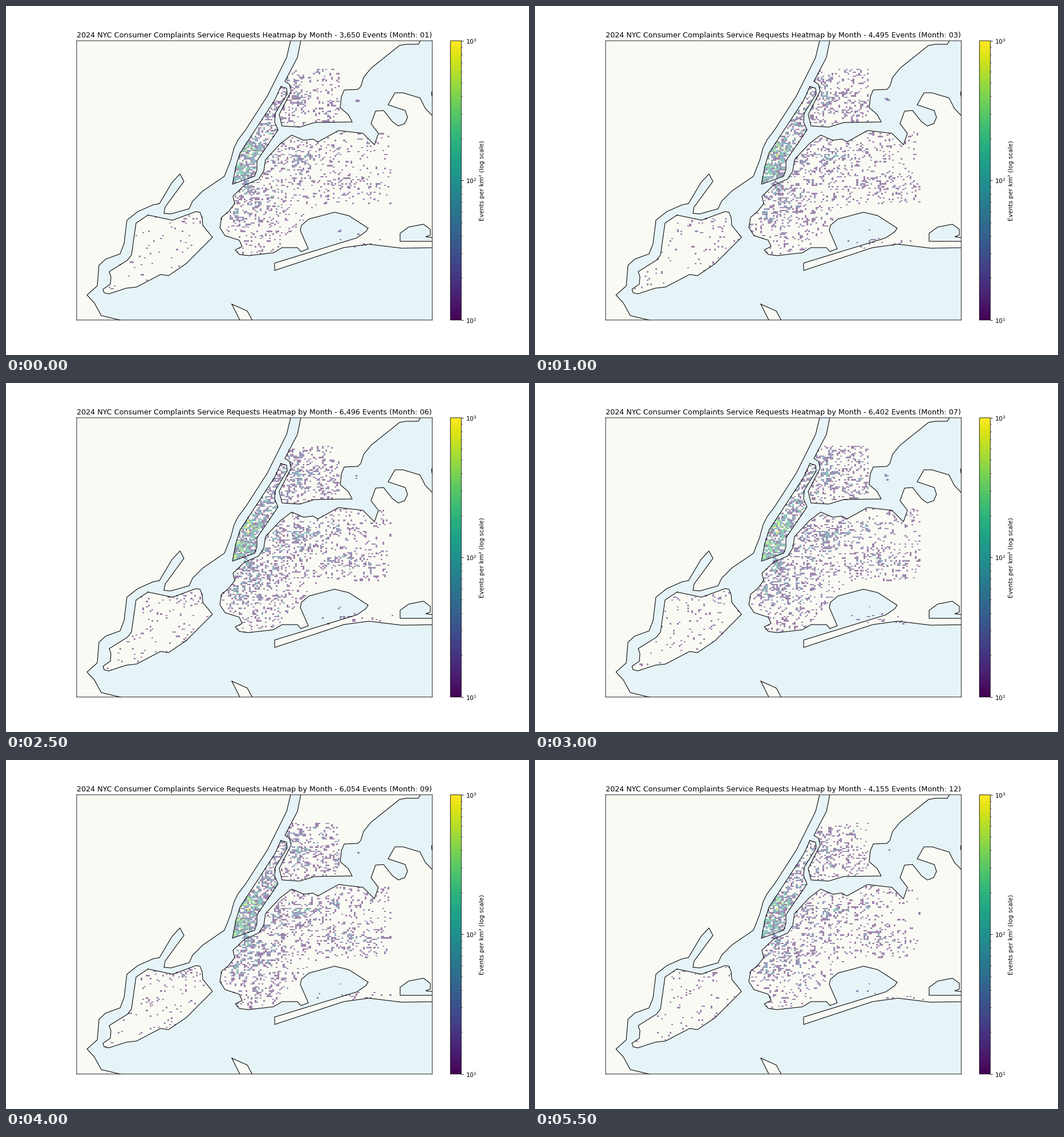
A matplotlib script for the animation above (6000 ms loop, 917 by 611 pixels).

```python
import numpy as np
import matplotlib.pyplot as plt
from matplotlib.animation import FuncAnimation
from matplotlib.cm import ScalarMappable
from matplotlib.colors import LogNorm
from matplotlib.path import Path

WIDTH, HEIGHT, DPI = 917, 611, 64
PT = 76.4 / DPI  # scale for point sizes
LEFT, RIGHT, TOP, BOTTOM = 123.9, 747.3, 60.9, 549.8
BINS = 200
CELL_KM2 = 0.0835
LAND, WATER = "#fafaf5", "#e6f3f7"

# Monthly totals, filled in linearly between the key months
TOTALS = np.interp(range(1, 13), [1, 3, 4, 6, 8, 10, 12],
                   [3650, 4495, 5422, 6496, 6307, 5800, 4155]).round().astype(int)

plt.rcParams.update({
    "font.family": "DejaVu Sans", "font.size": 10 * PT,
    "axes.linewidth": 0.8 * PT, "axes.titlepad": 6 * PT, "axes.labelpad": 4 * PT,
    "ytick.major.size": 3.5 * PT, "ytick.minor.size": 2 * PT,
    "ytick.major.width": 0.8 * PT, "ytick.minor.width": 0.6 * PT,
    "ytick.major.pad": 3.5 * PT,
})

# Key points of the coastlines, in stage pixels
WEST_MAINLAND = [
    (110, 50), (502, 50), (499, 61), (492, 90), (458, 158), (420, 217), (407, 234),
    (400, 248), (394, 270), (383, 298), (345, 324), (327, 342), (321, 355), (289, 364),
    (277, 363), (279, 352), (312, 307), (305, 294), (291, 309), (269, 346), (258, 348),
    (231, 360), (212, 375), (207, 416), (200, 434), (175, 443), (163, 454), (160, 490),
    (142, 506), (155, 520), (167, 542), (230, 557), (110, 560)]
STATEN_ISLAND = [
    (249, 366), (292, 375), (333, 360), (340, 361), (344, 371), (345, 384), (362, 405),
    (316, 451), (285, 472), (271, 470), (229, 492), (211, 494), (180, 504), (172, 502),
    (170, 496), (183, 487), (184, 474), (181, 465), (213, 445), (220, 436), (228, 380)]
MANHATTAN = [
    (482, 141), (492, 144), (493, 154), (472, 188), (471, 203), (477, 217), (440, 271),
    (440, 286), (436, 298), (397, 312), (403, 281), (410, 258), (471, 165)]
NORTH_MAINLAND = [
    (519, 50), (511, 90), (489, 132), (497, 137), (500, 149), (479, 190), (484, 210),
    (515, 212), (541, 204), (607, 203), (600, 190), (586, 178), (588, 159), (593, 147),
    (617, 146), (622, 141), (627, 125), (640, 109), (690, 69), (702, 67), (723, 67),
    (733, 50)]
LONG_ISLAND = [
    (401, 346), (398, 333), (418, 314), (443, 303), (452, 289), (455, 269), (481, 241),
    (501, 226), (522, 235), (538, 233), (547, 238), (583, 218), (626, 223), (646, 243),
    (653, 223), (640, 206), (648, 184), (662, 183), (678, 203), (688, 210), (699, 206),
    (704, 195), (700, 183), (670, 173), (682, 152), (696, 152), (726, 161), (735, 179),
    (760, 205), (760, 423), (694, 424), (636, 417), (592, 423), (471, 463), (471, 450),
    (615, 406), (631, 395), (635, 389), (601, 367), (576, 361), (531, 373), (518, 384),
    (516, 393), (530, 425), (517, 430), (511, 423), (484, 423), (469, 432), (425, 437),
    (409, 435), (402, 427), (414, 421), (409, 410), (384, 402), (375, 388), (378, 370),
    (390, 360)]
INLET = [(760, 412), (691, 412), (691, 398), (706, 387), (732, 382), (744, 391),
         (744, 401), (736, 404), (760, 407)]
HOOK = [(396, 522), (423, 534), (436, 558), (414, 558)]
EAST_POINT = [(750, 147), (746, 151), (747, 158), (750, 160)]
LANDS = [WEST_MAINLAND, STATEN_ISLAND, MANHATTAN, NORTH_MAINLAND, LONG_ISLAND,
         HOOK, EAST_POINT]

x_edges = np.linspace(LEFT, RIGHT, BINS + 1)
y_edges = np.linspace(TOP, BOTTOM, BINS + 1)
X, Y = np.meshgrid((x_edges[1:] + x_edges[:-1]) / 2, (y_edges[1:] + y_edges[:-1]) / 2)


def inside(outline):
    points = np.column_stack([X.ravel(), Y.ravel()])
    return Path(outline + outline[:1]).contains_points(points).reshape(X.shape)


def bump(x, y, sx, sy, rate):
    return rate * np.exp(-((X - x) / sx) ** 2 / 2 - ((Y - y) / sy) ** 2 / 2)


def base_rates():
    """Expected events per cell: land areas with bumps, times lumpy noise."""
    park = (abs(35 * (X - 447) + 22 * (Y - 230)) < 103) & (abs(Y - 230) < 18)
    manhattan = 0.9 + bump(427, 258, 12, 13, 6) + bump(414, 288, 9, 9, 3)
    bronx = 0.15 + bump(508, 160, 14, 18, 0.4)
    brooklyn_queens = (0.07 + bump(440, 345, 32, 38, 0.28) + bump(425, 321, 8, 6, 1.2)
                       + bump(404, 370, 6, 7, 1.2) + bump(495, 275, 32, 22, 0.25)
                       + bump(527, 264, 18, 4, 1.2) + bump(577, 253, 5, 4, 1.5)
                       + bump(595, 312, 25, 12, 0.3))
    staten = 0.02 + bump(315, 372, 35, 7, 0.1)
    city_edge = (X < 675) & (Y > 220) & ((Y < 348) | (X + 0.9 * Y < 860))

    rates = inside(MANHATTAN) * np.where(park, 0.1, 1) * manhattan
    rates += inside(NORTH_MAINLAND) * (X < 586) * (Y > 110) * bronx
    rates += inside(LONG_ISLAND) * city_edge * brooklyn_queens
    rates += inside(STATEN_ISLAND) * staten
    # Small islands, the airport and the beaches
    rates += bump(617, 166, 2.5, 4, 0.2) + bump(586, 393, 1, 1, 4)
    rates += bump(615, 413, 28, 4, 0.08) + bump(421, 309, 2.5, 1.5, 8)

    noise = np.random.default_rng(11).normal(size=X.shape)
    noise += (np.roll(noise, 1, axis=1) + np.roll(noise, 1, axis=0)) / 2
    return rates * np.exp(1.55 * np.minimum(noise / 1.5 ** 0.5, 1.6) - 1)


RATES = base_rates()
RATES /= RATES.sum()
DOWNTOWN = bump(401.5, 304, 2.4, 2.6, 1) * inside(MANHATTAN)


def density(month):
    total = TOTALS[month]
    rates = RATES * total + DOWNTOWN * (total - 3200) / 60
    rng = np.random.default_rng(100 + month)
    events = rng.multinomial(total, rates.ravel() / rates.sum()).reshape(X.shape)
    return np.ma.masked_equal(events, 0) / CELL_KM2


def pixel_axes(left, right):
    axes = fig.add_axes([left / WIDTH, 1 - BOTTOM / HEIGHT,
                         (right - left) / WIDTH, (BOTTOM - TOP) / HEIGHT])
    for spine in axes.spines.values():
        spine.set_snap(False)
    return axes


fig = plt.figure(figsize=(WIDTH / DPI, HEIGHT / DPI), dpi=DPI, facecolor="white")
ax = pixel_axes(LEFT, RIGHT)
ax.set(xlim=(LEFT, RIGHT), ylim=(BOTTOM, TOP), xticks=[], yticks=[], facecolor=WATER)

for outline, color in [(land, LAND) for land in LANDS] + [(INLET, WATER)]:
    xs, ys = zip(*outline, outline[0])
    ax.fill(xs, ys, color=color, lw=0, zorder=0)
    ax.plot(xs, ys, color="black", lw=PT, zorder=2)

norm = LogNorm(10, 1000)
mesh = ax.pcolormesh(x_edges, y_edges, density(0), cmap="viridis", norm=norm,
                     alpha=0.5, zorder=1)
title = ax.set_title("")

bar = fig.colorbar(ScalarMappable(norm, "viridis"), cax=pixel_axes(779.2, 798.3))
bar.outline.set_snap(False)
bar.set_label("Events per km² (log scale)")


def update(month):
    mesh.set_array(density(month))
    title.set_text("2024 NYC Consumer Complaints Service Requests Heatmap by Month"
                   f" - {TOTALS[month]:,} Events (Month: {month + 1:02d})")
    return mesh, title


anim = FuncAnimation(fig, update, frames=12, interval=500, repeat=True, repeat_delay=0)
plt.show()
```
